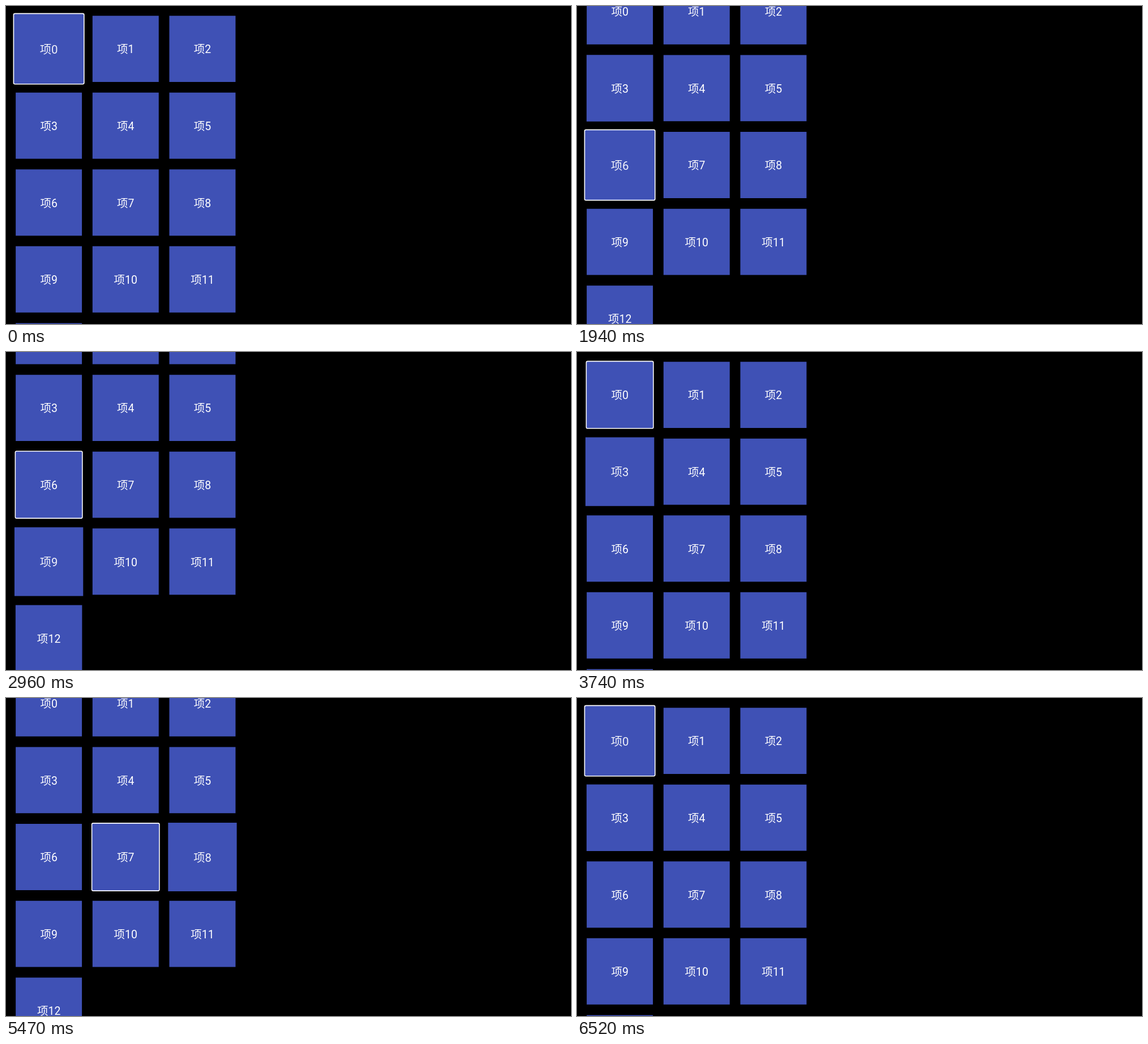
Write an HTML page with a canvas that moves like this. It is 998x561 px and loops after 7330 ms.

```html
<!DOCTYPE html>
<html lang="zh">
<head>
<meta charset="utf-8">
<style>
html, body { margin: 0; width: 100%; height: 100%; overflow: hidden; background: #000; }
canvas { display: block; }
</style>
</head>
<body>
<canvas id="stage" width="998" height="561"></canvas>
<script>
const canvas = document.getElementById('stage');
const ctx = canvas.getContext('2d');

// Layout on a 1920 x 1080 screen
const WIDTH = 1920, HEIGHT = 1080;
const SIZE = 225, PITCH = 261, PAD = 33, RING = 3;
const COLS = 3, ROWS = 5, COUNT = 13;
const MAX_SCROLL = 2 * PAD + (ROWS - 1) * PITCH + SIZE - HEIGHT;

// Timing in ms: the screen refreshes every STEP, keys land LEAD before a refresh
const LOOP = 7330, START = 1245, STEP = 131, LEAD = 35;
const GROW = 0.05, GROW_MS = 300, SHRINK_MS = 500;

// One character per refresh: the arrow key pressed, or a dot
const KEYS = 'D..D..D..D.U.U.U...U...RD..D..R.L.LU..U';
const JUMP = { D: COLS, U: -COLS, R: 1, L: -1 };

const clamp = (v, lo, hi) => Math.min(hi, Math.max(lo, v));
const cellX = i => PAD + (i % COLS) * PITCH + SIZE / 2;
const cellY = i => PAD + Math.floor(i / COLS) * PITCH + SIZE / 2;
const scrollFor = i => clamp(cellY(i) - HEIGHT / 2, 0, MAX_SCROLL);

// cubic-bezier(0, 0, 0.2, 1)
function ease(x) {
  if (x <= 0) return 0;
  if (x >= 1) return 1;
  let lo = 0, hi = 1;
  for (let i = 0; i < 24; i++) {
    const s = (lo + hi) / 2;
    if (0.6 * (1 - s) * s * s + s * s * s < x) lo = s; else hi = s;
  }
  return 3 * (1 - lo) * lo * lo + lo * lo * lo;
}

// Critically damped spring that snaps when close
function spring(age) {
  const p = 0.0314 * age;
  const v = 1 - (1 + p) * Math.exp(-p);
  return v > 0.96 ? 1 : v;
}

const tween = (from, to, start, span) => t => from + (to - from) * ease((t - start) / span);

function stateAt(t) {
  const grow = Array.from({ length: COUNT }, (_, i) => () => i ? 0 : GROW);
  let focus = 0, scroll = () => 0;
  [...KEYS].forEach((key, k) => {
    const at = k * STEP - LEAD;
    if (key === '.' || at > t) return;
    const next = focus + JUMP[key];
    grow[focus] = tween(grow[focus](at), 0, at, SHRINK_MS);
    grow[next] = tween(grow[next](at), GROW, at + LEAD, GROW_MS);
    const from = scroll(at), to = scrollFor(next);
    scroll = now => from + (to - from) * spring(now - at);
    focus = next;
  });
  return { focus, scroll: scroll(t), scales: grow.map(g => 1 + g(t)) };
}

function square(size, radius, color) {
  ctx.fillStyle = color;
  ctx.beginPath();
  ctx.roundRect(-size / 2, -size / 2, size, size, radius);
  ctx.fill();
}

function drawTile(i, scale, focused, scroll) {
  ctx.save();
  ctx.translate(cellX(i), cellY(i) - scroll);
  ctx.scale(scale, scale);
  if (focused) square(SIZE + 2 * RING, 6, '#fff');
  square(SIZE, focused ? 3 : 0, '#3f51b5');
  ctx.fillStyle = scale > 1.01 ? 'rgba(255,255,255,0.92)' : '#fff';
  ctx.fillText('项' + i, 0, 15);
  ctx.restore();
}

function render(t) {
  const { focus, scroll, scales } = stateAt(t);
  ctx.setTransform(canvas.width / WIDTH, 0, 0, canvas.height / HEIGHT, 0, 0);
  ctx.fillStyle = '#000';
  ctx.fillRect(0, 0, WIDTH, HEIGHT);
  ctx.font = '37.5px Roboto, "Noto Sans CJK SC", "Noto Sans CJK", sans-serif';
  ctx.textAlign = 'center';
  scales.forEach((s, i) => drawTile(i, s, i === focus, scroll));
}

const origin = performance.now();
function frame() {
  const t = Math.max(0, performance.now() - origin) % LOOP;
  render(Math.floor((t - START) / STEP) * STEP);
  requestAnimationFrame(frame);
}
frame();
</script>
</body>
</html>
```
